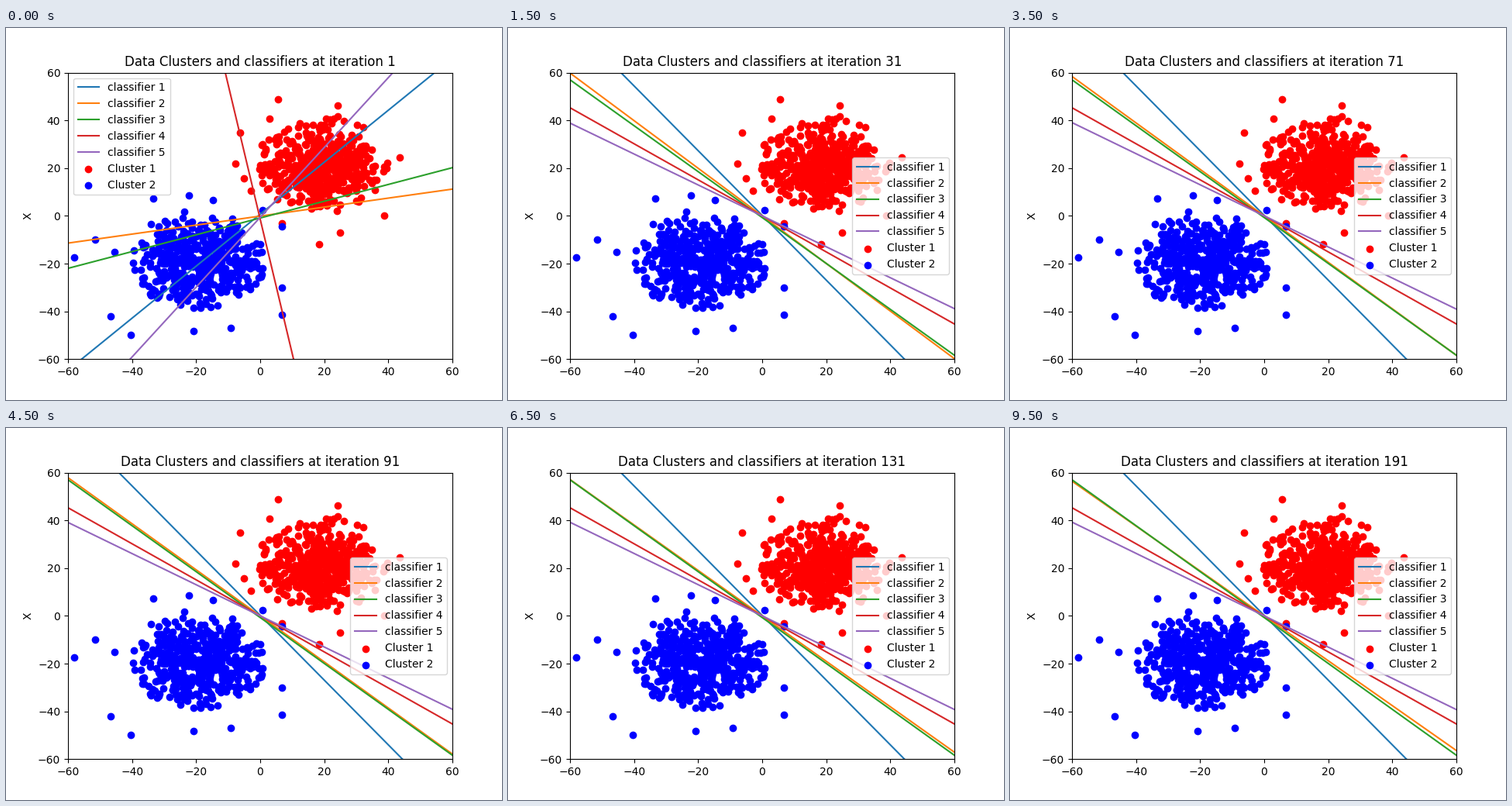
Recreate the animation shown at these times as a matplotlib script. Size 640 by 480 pixels, loop 10000 ms.

```python
import numpy as np
import matplotlib.pyplot as plt
from matplotlib.animation import FuncAnimation

FRAMES, INTERVAL = 20, 500
LIMIT = 60
CORE_POINTS = 450

# Only the clearly isolated points are placed by hand
RED_STRAYS = [(5.6, 48.8), (24.3, 46.2), (3, 40.6), (-6.4, 35), (-7.7, 22),
              (-5, 15.7), (-3, 10.5), (18.4, -12), (25, -7), (38.8, 0),
              (43.6, 24.4), (6.8, -3)]
BLUE_STRAYS = [(-58, -17.5), (-51.5, -10), (-46.8, -42), (-40.3, -50),
               (-45.5, -15), (-33.3, 7.3), (-22.3, 8.5), (-14.7, 6.5),
               (6.8, -4.4), (6.8, -30), (6.8, -41.5), (-9.3, -47),
               (-20.7, -48.2), (0.8, 2.3)]


def initial_lines():
    """Slope and intercept of each classifier before training."""
    return [(1.089, 0.7), (0.1885, -0.1), (0.3515, -0.9), (-5.634, -1.4), (1.463, -0.6)]


def trained_lines(step):
    """Settled classifiers; the second and fifth still converge slowly."""
    second = -(55.6 + 5.2 * np.exp((1 - step) / 9.75)) / LIMIT
    fifth = -0.655 + 0.01 * np.exp((1 - step) / 6)
    return [(-1.356, 0.2), (second, 0), (-0.9617, -0.7), (-0.755, 0), (fifth, 0)]


def cluster(rng, center, strays, sigma=10.5, radius=21):
    """Gaussian blob cut at a radius, plus the isolated points."""
    offsets = rng.normal(0, sigma, (2 * CORE_POINTS, 2))
    core = offsets[np.hypot(*offsets.T) < radius][:CORE_POINTS]
    return np.vstack([core + center, strays])


rng = np.random.default_rng(7)
red = cluster(rng, (19, 22), RED_STRAYS)
blue = cluster(rng, (-19.5, -18.5), BLUE_STRAYS)

fig, ax = plt.subplots(figsize=(6.4, 4.8), dpi=100)
xs = np.array([-70, 70])
lines = [ax.plot(xs, xs, label=f"classifier {i}")[0] for i in range(1, 6)]
ax.scatter(*red.T, color="red", label="Cluster 1")
ax.scatter(*blue.T, color="blue", label="Cluster 2")
ax.set(xlim=(-LIMIT, LIMIT), ylim=(-LIMIT, LIMIT), ylabel="X")


def update(step):
    params = trained_lines(step) if step else initial_lines()
    for line, (slope, intercept) in zip(lines, params):
        line.set_ydata(slope * xs + intercept)
    ax.set_title(f"Data Clusters and classifiers at iteration {10 * step + 1}")
    ax.legend(loc="center right" if step else "upper left")
    return lines


anim = FuncAnimation(fig, update, frames=FRAMES, interval=INTERVAL,
                     repeat=True, repeat_delay=0, blit=False)
plt.show()
```
